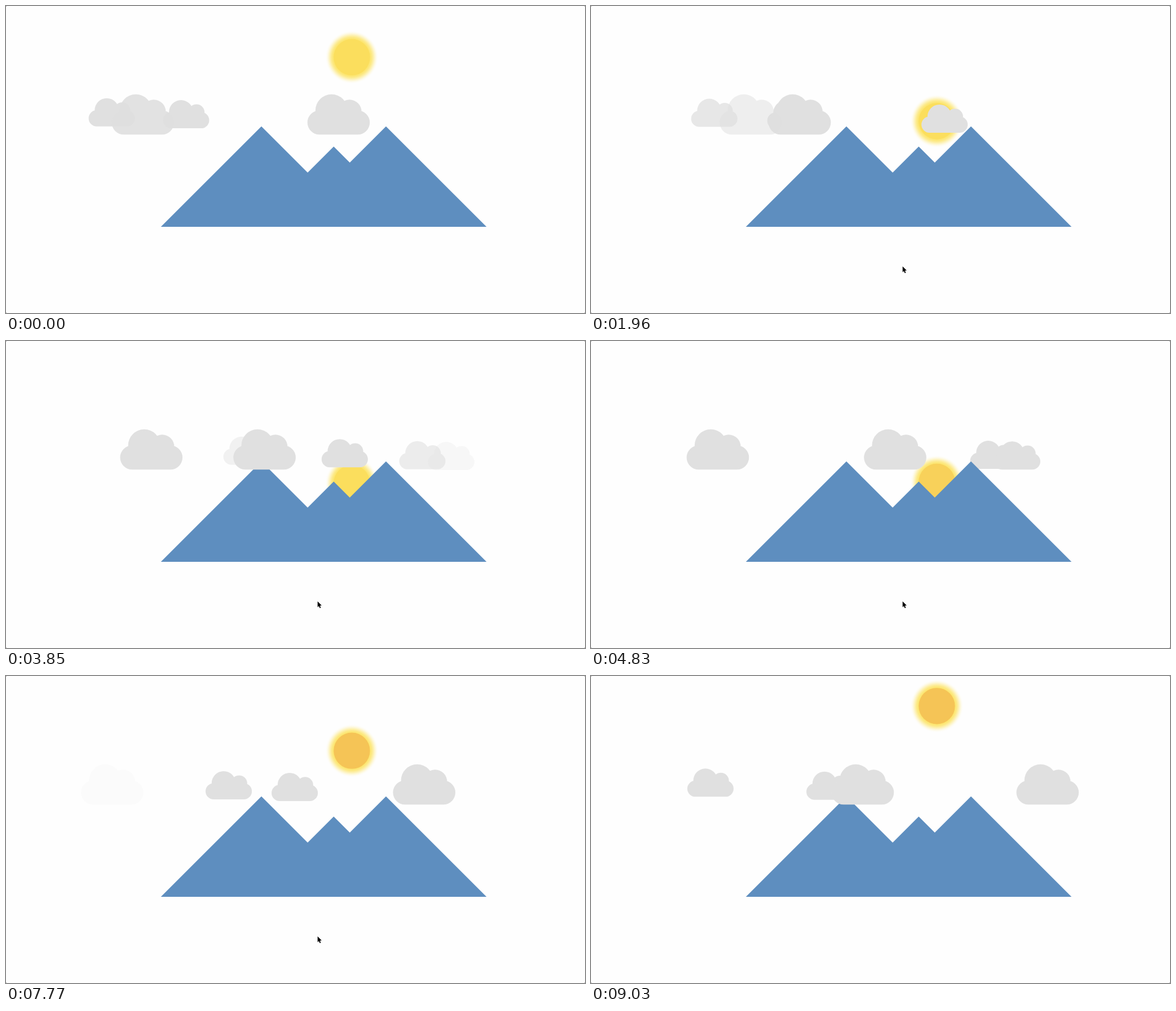
These frames come from a looping animation (1027x545 px, 9.1 s). An HTML page with a canvas:

```html
<!DOCTYPE html>
<html lang="en">
<head>
<meta charset="utf-8">
<title>Sun, mountains and clouds</title>
<style>
  html, body { margin: 0; width: 100%; height: 100%; overflow: hidden; background: #fefefe; }
  canvas { display: block; }
</style>
</head>
<body>
<canvas id="stage" width="1027" height="545"></canvas>
<script>
const ctx = document.getElementById('stage').getContext('2d');
const LOOP = 9100, STEP = 70, TAU = Math.PI * 2;
const clamp = v => Math.max(0, Math.min(1, v));
const mix = (a, b, u) => a + (b - a) * u;

// Cubic bezier easing, solved by bisection
function bezier(x1, y1, x2, y2) {
  const at = (a, b, s) => 3 * a * s * (1 - s) ** 2 + 3 * b * s * s * (1 - s) + s ** 3;
  return u => {
    let lo = 0, hi = 1;
    for (let i = 0; i < 24; i++) {
      const mid = (lo + hi) / 2;
      if (at(x1, x2, mid) < u) lo = mid; else hi = mid;
    }
    return at(y1, y2, lo);
  };
}
const ease = bezier(.25, .1, .25, 1);
const easeInOut = bezier(.42, 0, .58, 1);
const easeOut = u => u * (2 - u);

// Every cloud drifts once from one place to another, fading at both ends of its life
const drift = (from, to, start, life, curve) => ({ from, to, start, life, curve });
const small = (from, to, start, life = 8000) => drift(from, to, start, life, easeInOut);
const big = (from, to, start, life = 10000, curve = ease) => drift(from, to, start, life, curve);

const smallClouds = [
  small(-43, 388, -3720),
  small(626, 170, -5300),
  small(590, 555, 1100, 3700),
  small(701, 318, 3300),
  small(750, 12, 3600)
];
const bigClouds = [
  big(724, 133, -2110),
  big(684, 184, -8900),
  big(135, 930, 1050, 15050, easeOut),
  big(496, -4, 7770)
];

function disc(x, y, r) {
  ctx.moveTo(x + r, y);
  ctx.arc(x, y, r, 0, TAU);
}

function bigShape() {
  ctx.roundRect(0, 28.6, 110.6, 42.9, 21.4);
  disc(42.8, 28.6, 28.6);
  disc(74.6, 30.9, 21.4);
}

function smallShape() {
  ctx.roundRect(0, 21.4, 82.1, 28.6, 14.3);
  disc(32.1, 21.4, 21.4);
  disc(59.5, 21.7, 14.3);
}

function drawCloud(c, t, shape, top) {
  const u = (t - c.start) / c.life;
  if (u <= 0 || u >= 1) return;
  const x = mix(c.from, c.to, c.curve(u));
  ctx.save();
  ctx.globalAlpha = clamp(Math.min(u, 1 - u) / .12);
  ctx.fillStyle = '#e0e0e0';
  ctx.translate(x, top(x));
  ctx.beginPath();
  shape();
  ctx.fill();
  ctx.restore();
}

// The sun sinks and rises again; its light turns orange on the way up
function drawSun(t) {
  const x = 613.4, y = 253.5 - 298 * easeInOut(Math.abs(t - 4212) / 8000);
  const glow = ctx.createRadialGradient(x, y, 31, x, y, 47);
  for (let u = 0; u <= 1; u += .125)
    glow.addColorStop(u, `rgba(252,226,92,${.9 * Math.cos(u * TAU / 4) ** 2})`);
  ctx.fillStyle = glow;
  ctx.beginPath();
  disc(x, y, 47);
  ctx.fill();
  const u = clamp((t - 4000) / 1700);
  ctx.fillStyle = `rgb(${mix(251, 245, u)},${mix(222, 196, u)},${mix(93, 86, u)})`;
  ctx.beginPath();
  disc(x, y, 32.2);
  ctx.fill();
}

// Three right-angled peaks on one base line
function drawMountains() {
  ctx.fillStyle = '#5e8ebf';
  ctx.beginPath();
  for (const [x, h] of [[453, 178.3], [581.3, 142.5], [674, 178.3]]) {
    ctx.moveTo(x - h, 392);
    ctx.lineTo(x, 392 - h);
    ctx.lineTo(x + h, 392);
  }
  ctx.fill();
}

// The pointer comes in from below, rests, and leaves the same way
const arrow = new Path2D('M0 0V10.3L2.3 8.2 3.9 12 5.7 11.2 4.1 7.5 7.2 7.3Z');
function drawCursor(t) {
  const away = Math.max(0, 1050 - t, t - 7850) / 450;
  if (away > 1) return;
  ctx.save();
  ctx.translate(552.7 + 13 * away, 462.3 + 86 * away);
  ctx.lineWidth = 1.2;
  ctx.strokeStyle = '#fff';
  ctx.stroke(arrow);
  ctx.fillStyle = '#000';
  ctx.fill(arrow);
  ctx.restore();
}

function draw(now) {
  const t = Math.floor((now % LOOP) / STEP) * STEP;
  ctx.fillStyle = '#fefefe';
  ctx.fillRect(0, 0, 1027, 545);
  drawSun(t);
  smallClouds.forEach(c => drawCloud(c, t, smallShape, x => 160 + .0254 * x));
  drawMountains();
  bigClouds.forEach(c => drawCloud(c, t, bigShape, () => 156.8));
  drawCursor(t);
  ctx.fillStyle = '#999';
  for (const x of [0, 1026]) for (const y of [0, 544]) ctx.fillRect(x, y, 1, 1);
}

let start;
function tick(now) {
  start ??= now;
  draw(now - start);
  requestAnimationFrame(tick);
}
draw(0);
requestAnimationFrame(tick);
</script>
</body>
</html>
```
